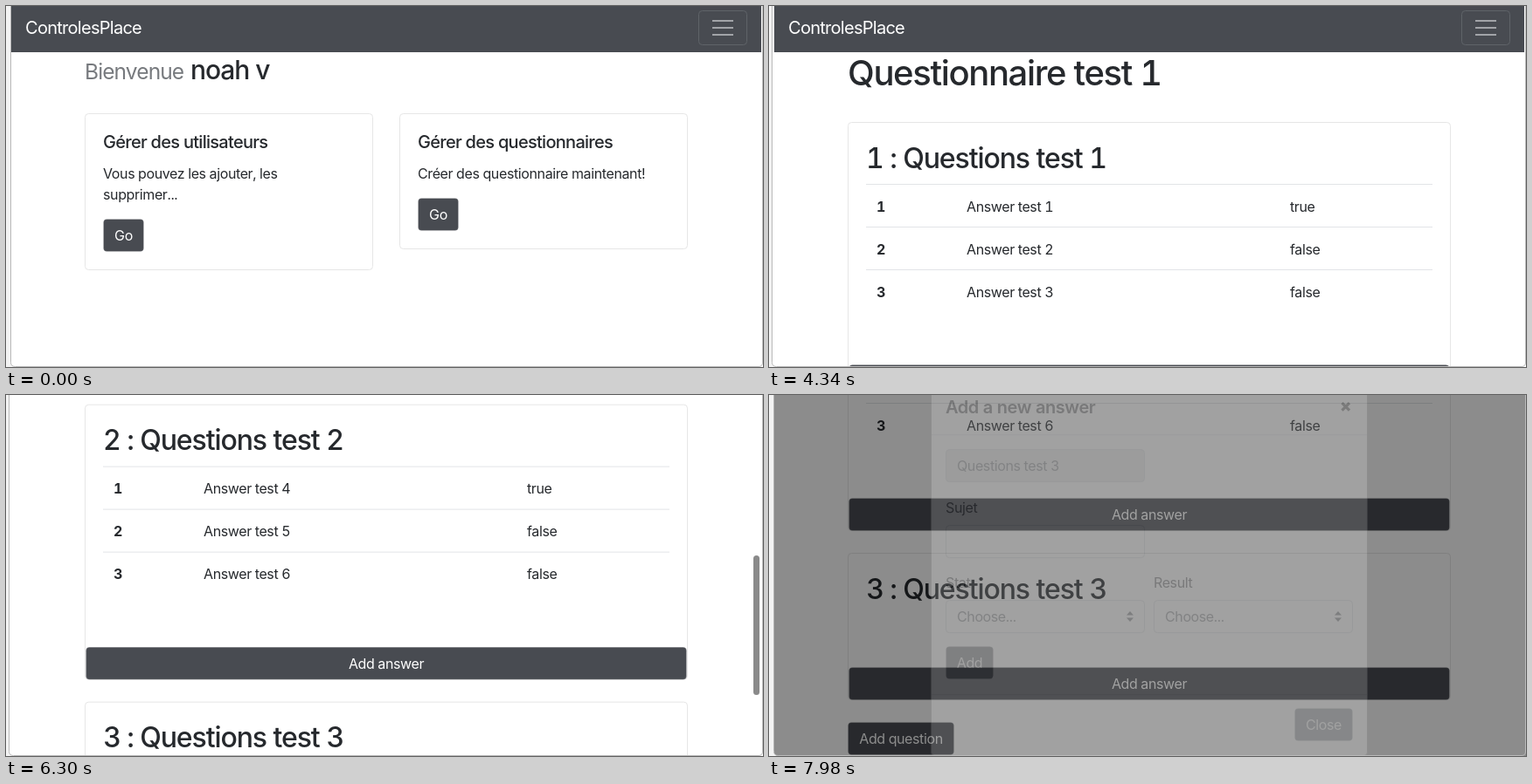
These frames come from a looping animation (866x414 px, 8000 ms). An HTML page:

```html
<!DOCTYPE html>
<html lang="fr">
<head>
<meta charset="utf-8">
<title>Questionnaires</title>
<style>
  html, body { margin: 0; width: 100%; height: 100%; overflow: hidden; background: #fff; }
  svg { display: block; width: 866px; height: 414px; }
  text {
    font-family: Inter, "Noto Sans", sans-serif;
    font-size: 16px;
    font-optical-sizing: none;
    font-variant-numeric: tabular-nums;
    letter-spacing: -.024em;
    fill: #26292d;
    white-space: pre;
  }
  .mid { text-anchor: middle; }
  .bold { font-weight: 700; }
  .brand { font-size: 20px; letter-spacing: -.036em; fill: #fff; }
  .title { font-size: 20px; font-weight: 500; letter-spacing: -.036em; }
  .head { font-size: 20px; font-weight: 600; letter-spacing: -.022em; }
  .h2 { font-size: 32px; font-weight: 500; letter-spacing: -.034em; }
  .h1 { font-size: 40px; font-weight: 500; letter-spacing: -.034em; }
  .small { font-size: 24.5px; letter-spacing: -.036em; fill: #777a7e; }
  .name { font-size: 30px; font-weight: 500; letter-spacing: -.035em; }
  .white { fill: #fff; }
  .grey { fill: #777b80; }
  .field { fill: #555a60; }
</style>
</head>
<body>
<svg id="stage" viewBox="0 0 866 414" xmlns="http://www.w3.org/2000/svg"></svg>
<script>
const LOOP = 8000;
const DARK = '#484b51', HOVER = '#383b41', LINE = '#e2e4e7', CARD = '#e6e6e6';
const stage = document.getElementById('stage');

// drawing helpers
const text = (x, y, s, cls = '') => `<text x="${x}" y="${y}" class="${cls}">${s}</text>`;
const box = (x, y, w, h, fill, stroke = 'none', r = 4) =>
  `<rect x="${x}" y="${y}" width="${w}" height="${h}" rx="${r}" fill="${fill}" stroke="${stroke}"/>`;
const rule = (x, y, w, h = 1) => box(x, y, w, h, LINE, 'none', 0);
const button = (x, y, w, label, id = '', fill = DARK) =>
  `<g id="${id}" fill="${fill}"><rect x="${x + .5}" y="${y + .5}" width="${w - 1}" height="37" rx="4" ` +
  'stroke="#fff" stroke-opacity=".16"/>' + text(x + w / 2, y + 25, label, 'mid white') + '</g>';
const arrows = (x, y) =>
  `<path d="M${x - 4} ${y - 1.5}h8l-4 -4.5zM${x - 4} ${y + 1.5}h8l-4 4.5z" fill="#3d4248"/>`;
const select = (x, y, w, label) =>
  box(x + .5, y + .5, w - 1, 37, '#fff', '#d0d5da') +
  text(x + 13, y + 25, label, 'field') + arrows(x + w - 17, y + 19);
const input = (x, y, w, fill = '#fff', label = '') =>
  box(x + .5, y + .5, w - 1, 37, fill, '#d0d5da') + text(x + 13, y + 25, label, 'field');

const navbar = () =>
  box(6, 0, 858, 53, DARK, 'none', 0) + text(22, 32, 'ControlesPlace', 'brand') +
  box(792.5, 5.5, 55, 39, 'none', '#5f6368') +
  [17, 25, 33].map(y => box(808, y - 1, 24, 2, '#a2a4a8', 'none', 0)).join('');

function welcome() {
  return navbar() +
    text(90, 84, 'Bienvenue', 'small') + text(211, 84, 'noah v', 'name') +
    box(90.5, 123.5, 329, 179, '#fff', CARD) +
    text(111, 163, 'Gérer des utilisateurs', 'title') +
    text(111, 198, 'Vous pouvez les ajouter, les') + text(111, 222, 'supprimer...') +
    button(111, 244, 47, 'Go') +
    box(450.5, 123.5, 329, 155, '#fff', CARD) +
    text(471, 163, 'Gérer des questionnaires', 'title') +
    text(471, 198, 'Créer des questionnaire maintenant!') +
    button(471, 220, 47, 'Go');
}

function quizRow([label, state], i) {
  const y = 103 + 79 * i;
  return (i % 2 ? '' : box(90, y, 690, i ? 77 : 79, '#f6f6f6', 'none', 0)) +
    (i ? rule(90, y, 690) : '') +
    text(102, y + 31, label) +
    select(372, y + 13, 196, state) +
    `<path d="M568 ${y + 13.5}h72.5a4 4 0 0 1 4 4v29a4 4 0 0 1 -4 4h-72.5z" fill="none" stroke="#8b8f94"/>` +
    text(606, y + 38, 'update', 'mid grey') +
    button(669, y + 13, 53.5, 'Edit', 'edit' + i);
}

function list() {
  const rows = [['Questionnaire test 1', 'actif'], ['Questionnaire test 2', 'actif'], ['test', 'inactif']];
  return navbar() + rule(90, 53, 690) +
    text(102, 84, 'Sujet', 'bold') + text(372, 84, 'stat', 'bold') +
    rows.map(quizRow).join('') + rule(90, 102, 690, 1.5) +
    button(90, 356, 90.5, 'new quiz', 'newQuiz');
}

function question(n, y, answers) {
  const h = answers ? 316 : 169;
  let s = box(90.5, y + .5, 689, h - 1, '#fff', CARD) +
    text(111, y + 52.5, `${n} : Questions test ${n}`, 'h2');
  for (let i = 0; i < answers; i++) {
    const ry = y + 71 + 49 * i;
    s += rule(111, ry, 648) + text(123, ry + 31.5, i + 1, 'bold') +
      text(226, ry + 31.5, `Answer test ${(n - 1) * 3 + i + 1}`) +
      text(596, ry + 31.5, i ? 'false' : 'true');
  }
  return s + button(91, y + h - 38, 688, 'Add answer', 'answer' + n);
}

const editor = () => navbar() + text(90, 91, 'Questionnaire test 1', 'h1') +
  question(1, 133, 3) + question(2, 475, 3) + question(3, 816, 0) +
  button(90, 1010, 122, 'Add question');

function modal(title, h, body) {
  return box(185.5, .5, 499, h - 1, '#fff', '#999') +
    text(202, 39, title, 'head') +
    '<path d="M655.5 27l8.5 8.5m0 -8.5l-8.5 8.5" stroke="#333" stroke-width="3.2"/>' +
    rule(186, 63, 498) + body + rule(186, h - 71, 498) +
    button(601, h - 55, 67, 'Close', '', '#6c757d');
}

const quizModal = () => modal('Add a new quiz', 377,
  text(202, 99, 'Sujet') + input(202, 112, 466) +
  text(202, 184, 'Stat') + select(202, 198, 228, 'Choose...') +
  button(202, 251, 55, 'Add'));

const answerModal = () => modal('Add a new answer', 432,
  input(202, 80, 228, '#e4e5e7', 'Questions test 3') +
  text(202, 153, 'Sujet') + input(202, 167, 228) +
  text(202, 239, 'Stat') + select(202, 253, 228, 'Choose...') +
  text(440, 239, 'Result') + select(440, 253, 228, 'Choose...') +
  button(202, 306, 55, 'Add'));

const group = (id, s) => `<g id="${id}">${s}</g>`;
stage.innerHTML = box(0, 0, 866, 414, '#fff', 'none', 0) +
  group('welcome', welcome()) + group('list', list()) + group('editor', editor()) +
  '<rect id="bar" x="855" width="7" rx="3.5" fill="#8a8a8a"/>' +
  '<rect id="shade" x="6" y="0" width="860" height="414"/>' +
  group('quizModal', quizModal()) + group('answerModal', answerModal()) +
  '<path id="gutter" fill="#f3f3f3"/><path id="edge" fill="none" stroke="#b9b9b9"/>';

const el = {};
stage.querySelectorAll('[id]').forEach(n => { if (n.id) el[n.id] = n; });

// timing helpers
const ramp = (t, a, b) => Math.min(1, Math.max(0, (t - a) / (b - a)));
const easeOut = p => 1 - Math.pow(1 - p, 1.8);
const show = (node, on) => node.setAttribute('display', on ? 'inline' : 'none');

// monotone cubic through [time, scroll] points
const path = [[5190, 0], [5530, 116], [6300, 464], [6860, 643], [7260, 635]];
const slope = i => (path[i + 1][1] - path[i][1]) / (path[i + 1][0] - path[i][0]);
function tangent(i) {
  if (i === 0 || i === path.length - 1) return 0;
  const a = slope(i - 1), b = slope(i);
  return a * b <= 0 ? 0 : 2 * a * b / (a + b);
}
function scrollAt(t) {
  const last = path.length - 1;
  if (t <= path[0][0]) return 0;
  if (t >= path[last][0]) return path[last][1];
  let i = 0;
  while (t > path[i + 1][0]) i++;
  const [t0, y0] = path[i], [t1, y1] = path[i + 1];
  const d = t1 - t0, u = (t - t0) / d, v = 1 - u;
  return v * v * (1 + 2 * u) * y0 + u * u * (3 - 2 * u) * y1 +
    d * u * v * (v * tangent(i) - u * tangent(i + 1));
}

function placeModal(node, alpha, slide) {
  show(node, alpha > 0);
  node.setAttribute('opacity', alpha);
  node.setAttribute('transform', `translate(0 ${28 - 50 * (1 - slide)})`);
}

function render(t) {
  const onList = t >= 700 && t < 4130, onEditor = t >= 4130;
  show(el.welcome, t < 700);
  show(el.list, onList);
  show(el.editor, onEditor);

  el.newQuiz.setAttribute('fill', t >= 1610 && t < 2970 ? HOVER : DARK);
  el.edit0.setAttribute('fill', t >= 3570 ? HOVER : DARK);

  const max = 635, y = scrollAt(t), over = Math.max(0, y - max);
  el.editor.setAttribute('transform', `translate(0 ${-y})`);
  const thumb = 160 - over / 2;
  show(el.bar, t >= 5250 && t < 7490);
  el.bar.setAttribute('y', over ? 411 - thumb : 2 + .392 * y);
  el.bar.setAttribute('height', thumb);
  el.bar.setAttribute('opacity', 1 - ramp(t, 7320, 7490));

  const quizShade = ramp(t, 1860, 1970) - ramp(t, 2970, 3070);
  const answerShade = ramp(t, 7760, 7930);
  el.shade.setAttribute('opacity', .45 * Math.max(quizShade, answerShade));

  const leave = ramp(t, 2900, 2990);
  placeModal(el.quizModal, ramp(t, 1970, 2110) - leave,
    easeOut(ramp(t, 1970, 2180)) - easeOut(leave));
  placeModal(el.answerModal, ramp(t, 7954, 8104), easeOut(ramp(t, 7967, 8267)));

  const x = t < 700 || t >= 7760 ? 5.5 : 3.5;
  el.gutter.setAttribute('d', `M0 0H${x}V408.5Q${x} 413.5 ${x + 5} 413.5V414H0z`);
  el.edge.setAttribute('d', `M${x} 0V408.5Q${x} 413.5 ${x + 5} 413.5H861Q865.5 413.5 865.5 409V0`);
}

const start = performance.now();
function tick() {
  render((performance.now() - start) % LOOP);
  requestAnimationFrame(tick);
}
render(0);
requestAnimationFrame(tick);
</script>
</body>
</html>
```
